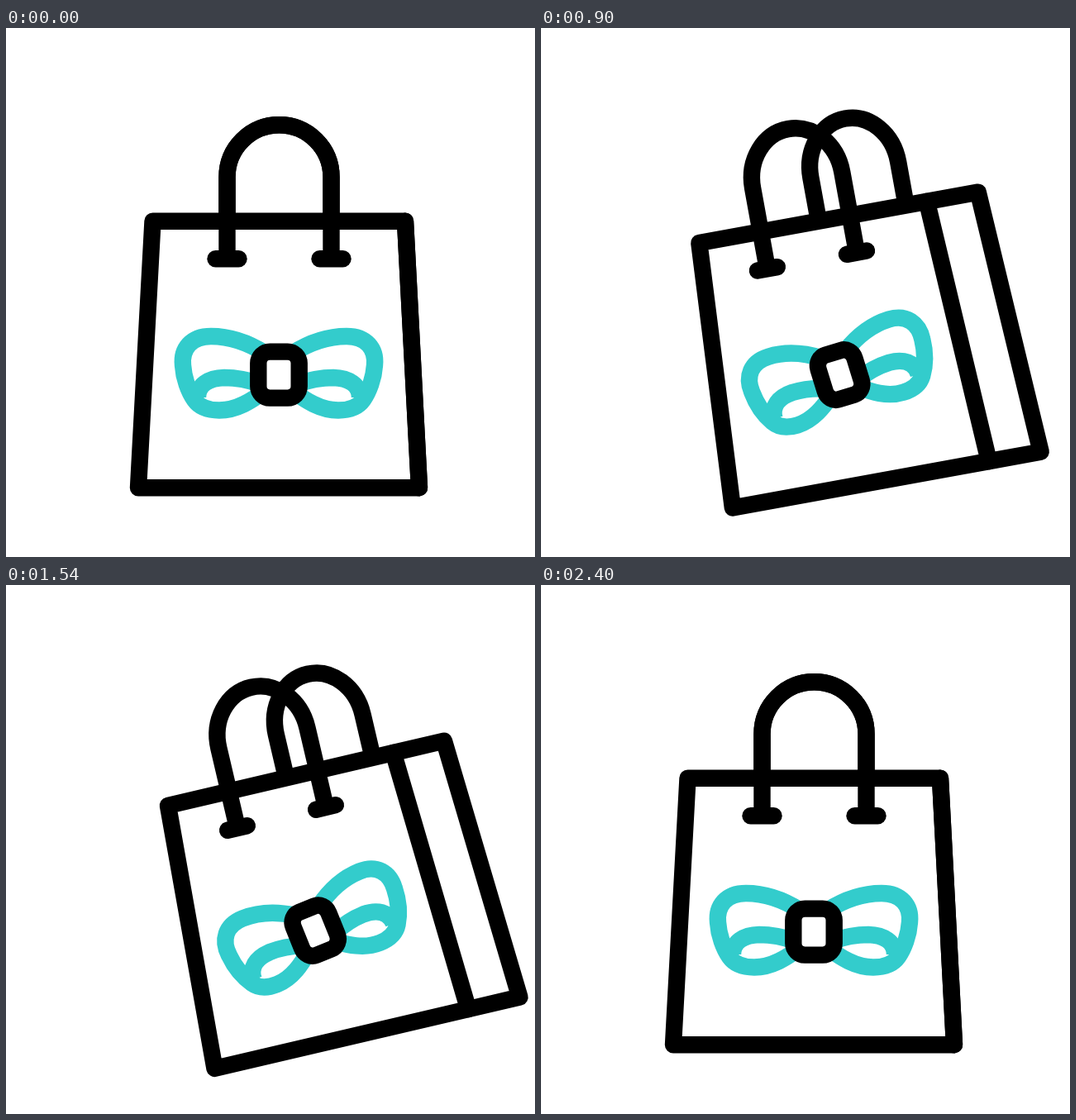
Write an HTML page with a canvas that moves like this. It is 640 px wide and 640 px high and loops after 2420 ms.

```html
<!DOCTYPE html>
<html lang="en">
<head>
<meta charset="utf-8">
<title>Swinging gift bag</title>
<style>
  html, body { margin: 0; width: 100%; height: 100%; overflow: hidden; background: #fff; }
  canvas { display: block; width: 100vw; height: 100vh; }
</style>
</head>
<body>
<canvas id="stage" width="640" height="640"></canvas>
<script>
const ctx = document.getElementById('stage').getContext('2d');
const LOOP = 2420, STEP = 20, TURN = 1200;
const BLACK = '#000', TEAL = '#33cccc';
const PIVOT = { x: 330.2, y: 170.3 };
const BOW = { x: 330, y: 419.6 };

const mix = (a, b, k) => a + (b - a) * k;
const ease = x => x * x * (3 - 2 * x);

// Piecewise eased value through [time, value] keys
function keyed(keys, t) {
  for (let i = 1; i < keys.length; i++) {
    const [t0, a] = keys[i - 1], [t1, b] = keys[i];
    if (t <= t1) return mix(a, b, ease((t - t0) / (t1 - t0)));
  }
  return keys[keys.length - 1][1];
}

const SWING = [[0, 0], [400, 15], [800, -15], [1200, 15]];
const OPENING = [[0, 0], [800, 1]];

function rotateAbout(p, degrees) {
  ctx.translate(p.x, p.y);
  ctx.rotate(degrees * Math.PI / 180);
  ctx.translate(-p.x, -p.y);
}

function stroke(color, path) {
  ctx.strokeStyle = color;
  ctx.beginPath();
  path();
  ctx.stroke();
}

function polyline(points, closed) {
  stroke(BLACK, () => {
    points.forEach(([x, y]) => ctx.lineTo(x, y));
    if (closed) ctx.closePath();
  });
}

function handle(left, right, bottom) {
  const radius = (right - left) / 2;
  ctx.lineCap = 'butt';
  stroke(BLACK, () => {
    ctx.moveTo(left, bottom);
    ctx.lineTo(left, 180.3);
    ctx.ellipse(left + radius, 180.3, radius, 63, 0, Math.PI, 2 * Math.PI);
    ctx.lineTo(right, bottom);
  });
  ctx.lineCap = 'round';
}

function bag(open) {
  const top = 233.7, bottom = 556.3;
  const frontTop = mix(483, 457.5, open), frontBottom = mix(500, 475.1, open);
  const sideTop = mix(483, 520.5, open), sideBottom = mix(500, 539, open);

  handle(mix(267.5, 324.5, open), mix(393.5, 432, open), top);
  polyline([[frontTop, top], [sideTop, top], [sideBottom, bottom], [frontBottom, bottom]]);
  polyline([[177.5, top], [frontTop, top], [frontBottom, bottom], [160, bottom]], true);

  const left = mix(267.5, 253.1, open), right = mix(393.5, 363, open);
  const foot = mix(14, 12.2, open);
  handle(left, right, 279.3);
  for (const x of [left, right]) polyline([[x - foot, 279.3], [x + foot, 279.3]]);
}

function ribbon() {
  ctx.moveTo(314, 394);
  ctx.bezierCurveTo(292, 380, 268, 373, 248, 373);
  ctx.bezierCurveTo(224, 373, 212, 388, 214, 408);
  ctx.bezierCurveTo(215, 424, 221, 440, 228, 450);
  ctx.bezierCurveTo(235, 460, 246, 462.5, 258, 462.5);
  ctx.bezierCurveTo(280, 462.5, 298, 450, 312, 440);
  ctx.moveTo(308, 431);
  ctx.bezierCurveTo(294, 426, 278, 423, 264, 423);
  ctx.bezierCurveTo(245, 423.5, 232, 432, 232, 447);
}

function bow(open) {
  const center = mix(BOW.x, BOW.x - 13.6, open), scale = mix(1, 0.93, open);

  // Only the path is squeezed; the line keeps its weight
  const squeezed = (side, path) => () => {
    ctx.save();
    ctx.translate(center, 0);
    ctx.scale(side * scale, 1);
    ctx.translate(-BOW.x, 0);
    path();
    ctx.restore();
  };

  ctx.lineCap = 'butt';
  for (const side of [1, -1]) stroke(TEAL, squeezed(side, ribbon));
  stroke(BLACK, squeezed(1, () => {
    ctx.roundRect(BOW.x - 24.7, BOW.y - 28, 49.4, 56, 14);
    ctx.fillStyle = '#fff';
    ctx.fill();
  }));
}

function draw(t) {
  const phase = TURN - Math.abs(TURN - t);
  const swing = keyed(SWING, phase), open = keyed(OPENING, phase);

  ctx.fillStyle = '#fff';
  ctx.fillRect(0, 0, 640, 640);
  ctx.save();
  ctx.lineWidth = 20.4;
  ctx.lineJoin = ctx.lineCap = 'round';
  rotateAbout(PIVOT, swing);
  bag(open);
  rotateAbout(BOW, swing * 2 / 3);
  bow(open);
  ctx.restore();
}

const start = performance.now();
function tick() {
  const t = (performance.now() - start) % LOOP;
  draw(Math.floor(t / STEP) * STEP);
  requestAnimationFrame(tick);
}
tick();
</script>
</body>
</html>
```
